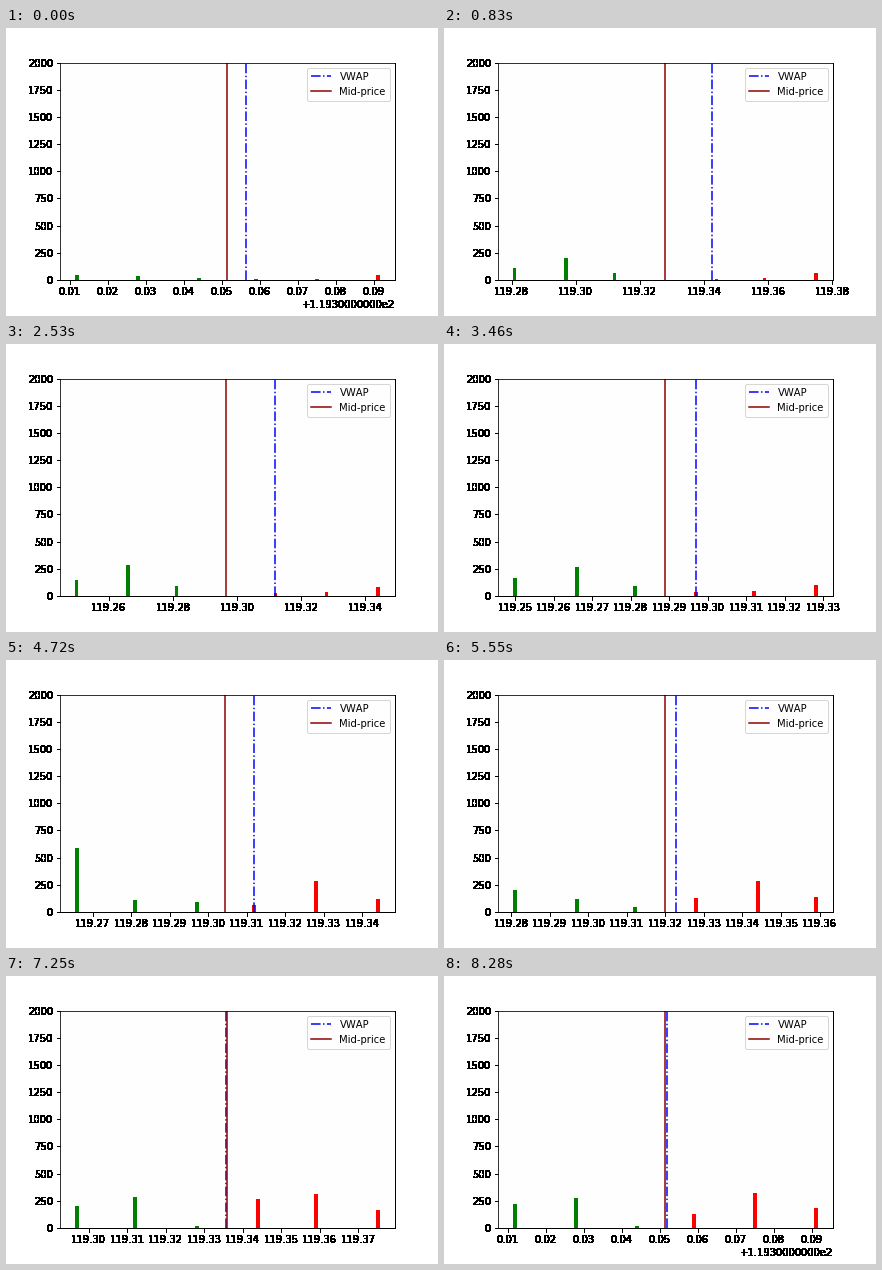
A matplotlib script for the animation above (8380 ms loop, 432 by 288 pixels).

```python
import matplotlib.pyplot as plt
import numpy as np
from matplotlib.animation import FuncAnimation
from matplotlib.ticker import ScalarFormatter

LOOP, INTERVAL, UPDATES = 8380, 20, 90
TICK, BASE, WIDTH = 1 / 64, 119.25, 0.001

# Updates arrive every 100 ms, apart from a few quick ones.
hold = np.full(UPDATES, 100)
hold[[0, 12, 14, 36, 39, 44, 55, 82]] = 30
hold[13] = 40
starts = np.cumsum(hold) - hold


def rise(s, mid, width):
    return 1 / (1 + np.exp((mid - s) / width))


def bump(s, mid, width):
    return np.exp(-((s - mid) / width) ** 2)


def order_sizes(s):
    """Sizes from the deepest bid to the deepest ask."""
    filling = 1 - np.exp(-s / 8)
    return np.array([
        46 + s + 80 * filling + 410 * bump(s, 52, 5),
        37 + 245 * filling - 200 * bump(s, 56, 11),
        15 + 80 * (rise(s, 8, 3) - rise(s, 60, 3)),
        5 + 0.9 * s + 220 * bump(s, 74, 12),
        8 + 0.9 * s + 230 * rise(s, 45, 2),
        46 + 1.5 * s])


def order_prices(s):
    """The lowest bid wanders by whole ticks; the spread widens twice."""
    low = round(np.interp(s, [0, 16, 40, 46, 52, 66, 71, 75, 80, 84],
                          [4, 0, 0, 2, 1, 3, 2, 4, 3, 4]))
    gap = any(abs(s - mid) < 2 for mid in (8.5, 27.5))
    levels = low + np.arange(6) + gap * (np.arange(6) > 2)
    return low, np.round(BASE + levels * TICK, 3)


def vwap_pull(s):
    """Position of the VWAP between mid-price (0) and best ask (1)."""
    return np.interp(s, [0, 12, 52, 68, 89], [0.65, 1, 1, -0.15, 0.04])


class PriceFormatter(ScalarFormatter):
    def format_data(self, value):
        mantissa, exponent = f"{value:.10e}".split("e")
        return f"{mantissa}e{int(exponent)}"


def harden(image, dpi):
    """Turn every touched pixel solid black."""
    solid = np.zeros_like(image)
    solid[..., 3] = image[..., 3] > 0
    return solid, 0, 0


noise = np.random.default_rng(7).uniform(0.97, 1.03, (UPDATES, 6))

plt.rcParams.update({"figure.subplot.bottom": 0.125, "font.size": 10,
                     "font.family": "DejaVu Sans", "text.kerning_factor": 6})
fig, ax = plt.subplots(figsize=(6, 4), dpi=72)
ax.set_facecolor("#fefefe")
bars = ax.bar(range(6), [0] * 6, WIDTH, color=["green"] * 3 + ["red"] * 3)
vwap_line = ax.axvline(0, color="blue", ls="-.", label="VWAP")
mid_line = ax.axvline(0, color="darkred", label="Mid-price")
ax.set_ylim(0, 2000)
ax.legend(loc="upper right")
formatter = PriceFormatter()
ax.xaxis.set_major_formatter(formatter)
for part in (ax.xaxis, ax.yaxis, ax.spines["right"], ax.spines["bottom"]):
    part.set_agg_filter(harden)


def update(i):
    now = i * INTERVAL + INTERVAL / 2
    step = np.searchsorted(starts, now, side="right") - 1
    low, prices = order_prices(step)

    for bar, price, size in zip(bars, prices, order_sizes(step) * noise[step]):
        bar.set_x(price - WIDTH / 2)
        bar.set_height(size)
    bid, ask = prices[2:4]
    mid = (bid + ask) / 2
    vwap = mid + vwap_pull(step) * (ask - mid)
    mid_line.set_xdata([mid, mid])
    vwap_line.set_xdata([vwap, vwap])

    pad = WIDTH / 2 + 0.05 * (prices[-1] - prices[0] + WIDTH)
    ax.set_xlim(prices[0] - pad, prices[-1] + pad)
    formatter.set_useOffset(119.3 if low == 4 else False)
    return [*bars, vwap_line, mid_line]


anim = FuncAnimation(fig, update, frames=LOOP // INTERVAL, interval=INTERVAL,
                     repeat=True, cache_frame_data=False)
plt.show()
```
